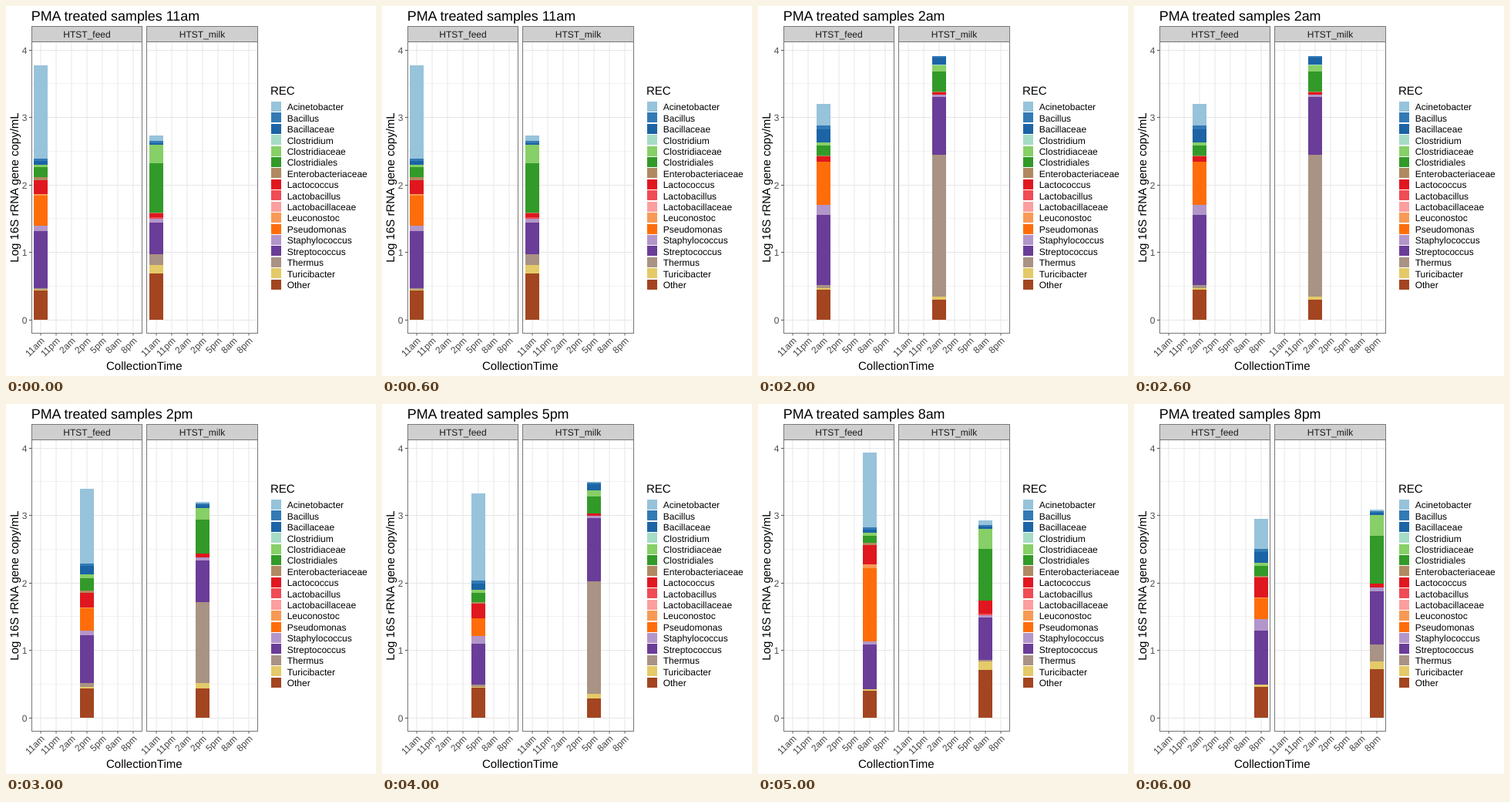
An HTML page with a canvas that plays this animation: 480x480 px, repeating every 7 s.

```html
<!DOCTYPE html>
<html lang="en">
<head>
<meta charset="utf-8">
<title>PMA treated samples</title>
<style>
  html, body { margin: 0; width: 100%; height: 100%; overflow: hidden; background: #fff; }
  canvas { display: block; }
</style>
</head>
<body>
<canvas width="480" height="480"></canvas>
<script>
const ctx = document.querySelector('canvas').getContext('2d');
const STEP = 1000;
const ZERO = 407, UNIT = 87.5, TOP = 46.5, BOTTOM = 424.5;
const times = ['11am', '11pm', '2am', '2pm', '5pm', '8am', '8pm'];

const taxa = {
  Ac: ['Acinetobacter', '#97c3db'],
  Ba: ['Bacillus', '#337ab5'],
  Bc: ['Bacillaceae', '#1b64a5'],
  Cm: ['Clostridium', '#a5dcc5'],
  Ce: ['Clostridiaceae', '#87cf67'],
  Cs: ['Clostridiales', '#329a28'],
  En: ['Enterobacteriaceae', '#af8a61'],
  Lc: ['Lactococcus', '#e0171f'],
  Lb: ['Lactobacillus', '#f04c55'],
  La: ['Lactobacillaceae', '#fb9f9f'],
  Le: ['Leuconostoc', '#f89a55'],
  Ps: ['Pseudomonas', '#ff6d0a'],
  St: ['Staphylococcus', '#b396c9'],
  Sr: ['Streptococcus', '#6a3d98'],
  Th: ['Thermus', '#a89384'],
  Tu: ['Turicibacter', '#e4ca68'],
  Ot: ['Other', '#a34520'],
};

// Upper edge of each segment, one stack per collection time
const feed = [
  { Ac: 77, Ba: 198, Bc: 201, Ce: 206, Cs: 209, En: 222, Lc: 226, Le: 244, Ps: 246, St: 285, Sr: 292, Th: 366, Tu: 368, Ot: 369 },
  { Ac: 122, Ba: 173, Bc: 176, Ce: 187, Cs: 191, En: 204, Lc: 205, Ps: 221, St: 287, Sr: 303, Tu: 368, Ot: 370 },
  { Ac: 127, Ba: 155, Bc: 160, Ce: 177, Cs: 181, En: 194, Lc: 195, Ps: 202, St: 258, Sr: 271, Th: 362, Tu: 366, Ot: 368 },
  { Ac: 110, Ba: 207, Bc: 210, Ce: 221, Cs: 226, En: 242, Lc: 245, Le: 264, Ps: 265, St: 294, Sr: 300, Th: 362, Tu: 367, Ot: 369 },
  { Ac: 116, Ba: 229, Bc: 233, Ce: 241, Cs: 245, En: 257, Lc: 259, Ps: 278, St: 301, Sr: 311, Th: 364, Tu: 367, Ot: 368 },
  { Ac: 63, Ba: 160, Bc: 163, Ce: 167, Cs: 171, En: 180, Lc: 183, Le: 208, Ps: 213, St: 308, Sr: 312, Tu: 370, Ot: 372 },
  { Ac: 149, Ba: 188, Bc: 192, Ce: 206, Cs: 210, En: 223, Lc: 225, Le: 251, Ps: 252, St: 279, Sr: 294, Tu: 364, Ot: 367 },
];
const milk = [
  { Ac: 168, Ba: 175, Bc: 178, Ce: 180, Cs: 204, En: 268, Lc: 269, Lb: 274, St: 276, Sr: 281, Th: 322, Tu: 336, Ot: 347 },
  { Ac: 130, Ba: 131, Bc: 132, Ce: 141, Cs: 157, Lc: 202, St: 205, Sr: 210, Th: 287, Tu: 357, Ot: 364 },
  { Ba: 65, Bc: 67, Cm: 76, Ce: 77, Cs: 85, En: 111, Lc: 112, St: 115, Sr: 118, Th: 193, Tu: 377, Ot: 381 },
  { Ac: 127, Ba: 129, Bc: 131, Ce: 135, Cs: 150, Lc: 194, St: 199, Sr: 203, Th: 257, Tu: 362, Ot: 369 },
  { Ac: 101, Ba: 102, Bc: 104, Ce: 112, Cs: 120, Lc: 142, St: 145, Sr: 148, Th: 230, Tu: 376, Ot: 382 },
  { Ac: 151, Ba: 157, Bc: 159, Ce: 162, Cs: 188, Lc: 255, Lb: 272, St: 274, Sr: 277, Th: 332, Tu: 334, Ot: 345 },
  { Ac: 137, Ba: 139, Bc: 141, Ce: 144, Cs: 171, Lc: 233, St: 238, Sr: 243, Th: 312, Tu: 334, Ot: 344 },
];
const panels = [
  { name: 'HTST_feed', left: 33.5, right: 176.5, firstX: 45, stacks: feed },
  { name: 'HTST_milk', left: 182.5, right: 326.5, firstX: 195, stacks: milk },
];

function text(str, x, y, { size = 12, color = '#000', align = 'left', angle = 0 } = {}) {
  ctx.save();
  ctx.translate(x, y);
  ctx.rotate(angle * Math.PI / 180);
  ctx.font = `${size}px "Liberation Sans", Arial, sans-serif`;
  ctx.textRendering = 'geometricPrecision';
  ctx.fillStyle = color;
  ctx.textAlign = align;
  ctx.fillText(str, 0, 0);
  ctx.restore();
}

function line(x1, y1, x2, y2, color) {
  ctx.strokeStyle = color;
  ctx.beginPath();
  ctx.moveTo(x1, y1);
  ctx.lineTo(x2, y2);
  ctx.stroke();
}

function drawPanel({ name, left, right, firstX, stacks }, step) {
  const width = right - left;
  const tickX = i => firstX + i * 20;

  for (let v = 0; v <= 4; v += 0.5) {
    const y = Math.floor(ZERO - v * UNIT) + 0.5;
    line(left, y, right, y, v % 1 ? '#f2f2f2' : '#e6e6e6');
  }
  times.forEach((label, i) => {
    const x = tickX(i);
    line(x, TOP, x, BOTTOM, '#e6e6e6');
    line(x, BOTTOM, x, BOTTOM + 3, '#555');
    text(label, x + 5.6, 435, { color: '#444', align: 'right', angle: -45 });
  });

  for (const [key, top] of Object.entries(stacks[step])) {
    ctx.fillStyle = taxa[key][1];
    ctx.fillRect(tickX(step) - 9, top, 18, ZERO - top);
  }

  ctx.fillStyle = '#cfcfcf';
  ctx.fillRect(left, 26.5, width, 20);
  ctx.strokeStyle = '#777';
  ctx.strokeRect(left, 26.5, width, 20);
  ctx.strokeRect(left, TOP, width, BOTTOM - TOP);
  text(name, left + width / 2, 41, { color: '#1a1a1a', align: 'center' });
}

function draw(step) {
  ctx.fillStyle = '#fff';
  ctx.fillRect(0, 0, 480, 480);
  text(`PMA treated samples ${times[step]}`, 32.7, 19, { size: 17.9 });
  panels.forEach(panel => drawPanel(panel, step));

  for (let v = 0; v <= 4; v++) {
    const y = Math.floor(ZERO - v * UNIT) + 0.5;
    line(30, y, 33, y, '#555');
    text(v, 27.5, y + 4, { color: '#4d4d4d', align: 'right' });
  }
  text('CollectionTime', 179.3, 472, { size: 15, align: 'center' });
  text('Log 16S rRNA gene copy/mL', 16, 235.5, { size: 15, align: 'center', angle: -90 });

  text('REC', 343, 115, { size: 15 });
  Object.values(taxa).forEach(([label, color], i) => {
    const y = 131 + i * 14.41;
    ctx.fillStyle = color;
    ctx.fillRect(344, Math.round(y) - 7, 13, 13);
    text(label, 364.7, Math.round(y + 4.35));
  });
}

let shown = -1;
function tick() {
  const step = Math.floor(performance.now() / STEP) % times.length;
  if (step !== shown) draw(shown = step);
  requestAnimationFrame(tick);
}
tick();
</script>
</body>
</html>
```
